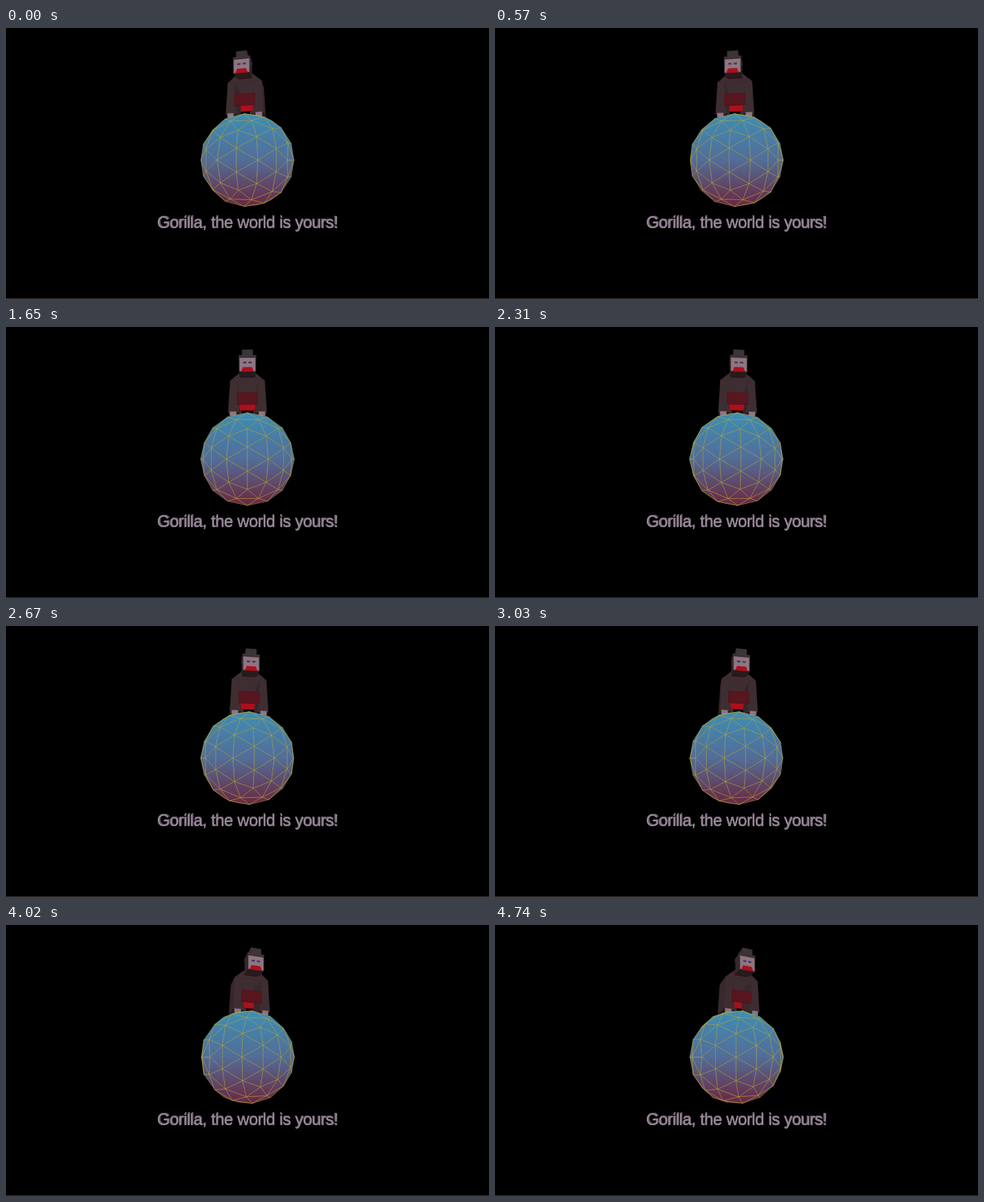
An HTML page with a canvas that plays this animation: 700 by 394 pixels, repeating every 4.77 s.

```html
<!DOCTYPE html>
<html lang="en">
<head>
<meta charset="utf-8">
<style>
  html, body { margin: 0; height: 100%; overflow: hidden; background: #000; }
  canvas { display: block; }
</style>
</head>
<body>
<canvas id="stage" width="700" height="394"></canvas>
<script>
const ctx = document.getElementById('stage').getContext('2d');
const LOOP = 4770, STEP = 30;
const CX = 350, CY = 192, FOCAL = 269, DIST = 4.08;

// Vector helpers
const sub = (a, b) => a.map((v, i) => v - b[i]);
const dot = (a, b) => a[0] * b[0] + a[1] * b[1] + a[2] * b[2];
const cross = (a, b) => [
  a[1] * b[2] - a[2] * b[1], a[2] * b[0] - a[0] * b[2], a[0] * b[1] - a[1] * b[0]];
const unit = a => a.map(v => v / Math.hypot(...a));
const mean = pts => [0, 1, 2].map(i => pts.reduce((s, p) => s + p[i], 0) / pts.length);

const turn = ([x, y, z], a) =>
  [x * Math.cos(a) + z * Math.sin(a), y, z * Math.cos(a) - x * Math.sin(a)];
const project = ([x, y, z]) =>
  [CX + x * FOCAL / (DIST - z), CY - y * FOCAL / (DIST - z)];

// Icosahedron with every edge split in n, pushed out to the unit sphere
function geodesic(n) {
  const phi = (1 + Math.sqrt(5)) / 2, corners = [], faces = [];
  for (const s of [-1, 1]) for (const t of [-phi, phi])
    corners.push([s, t, 0], [0, s, t], [t, 0, s]);
  const joined = (a, b) => Math.hypot(...sub(a, b)) < 2.1;
  corners.forEach((a, i) => corners.slice(i + 1).forEach((b, j) =>
    corners.slice(i + j + 2).forEach(c => {
      if (!joined(a, b) || !joined(b, c) || !joined(a, c)) return;
      const at = (u, v) => unit(a.map((w, k) => w * (n - u - v) + b[k] * u + c[k] * v));
      for (let u = 0; u < n; u++) for (let v = 0; u + v < n; v++) {
        faces.push([at(u, v), at(u + 1, v), at(u, v + 1)]);
        if (u + v < n - 1) faces.push([at(u + 1, v), at(u + 1, v + 1), at(u, v + 1)]);
      }
    })));
  return faces;
}

// Tapered block: front face given as seen on stage, extruded back by depth
function block(rgb, top, bottom, front, depth, wTop, wBottom = wTop, x = 0) {
  const scale = (DIST - front) / FOCAL;
  const corner = (side, w, y) => [(x + side * w / 2) * scale, (CY - y) * scale, front];
  const face = [corner(-1, wTop, top), corner(1, wTop, top),
    corner(1, wBottom, bottom), corner(-1, wBottom, bottom)];
  const back = face.map(([px, py]) => [px, py, front - depth]);
  const sides = face.map((p, i) => {
    const j = (i + 1) % 4;
    return [p, face[j], back[j], back[i]];
  });
  return { faces: [back, ...sides, face], rgb };
}
const pair = (x, ...shape) => [-x, x].map(side => block(...shape, side));

const FUR = [62, 46, 50], FELT = [60, 53, 56], SKIN = [142, 118, 132];
const RED = [172, 16, 28], WINE = [88, 22, 30], DUSK = [70, 62, 90];
const CHEST = .33, FACE = .6, FLAT = .01;

const gorilla = [
  block(FUR, 65, 78, CHEST, .4, 18, 50),
  block(FUR, 78, 113, CHEST, .4, 50, 46),
  ...pair(15, FUR, 112, 126, CHEST, .2, 8, 14),
  block(RED, 111, 121, CHEST, FLAT, 30, 22),
  ...pair(20, FUR, 79, 124, CHEST, .45, 10, 16),
  ...pair(21, SKIN, 123, 129, CHEST, FLAT, 9, 9),
  block(WINE, 95, 112, CHEST, FLAT, 30),
  block(WINE, 62, 67, .45, .2, 20),
  block(FELT, 33, 42, FACE, .24, 15.5),
  block(FELT, 41, 45, FACE, .26, 25),
  block(FUR, 43, 64, FACE, .24, 24.5),
  block(SKIN, 45, 64, FACE, FLAT, 22.5),
  ...pair(4, DUSK, 50.5, 52, FACE, FLAT, 4, 4),
  block(RED, 58.5, 64.5, FACE, FLAT, 13, 18),
];
const globe = { faces: geodesic(3) };

const sky = ctx.createLinearGradient(0, 124, 0, 260);
['#3d8fb6', '#526d98', '#6a2640'].forEach((c, i) => sky.addColorStop(i / 2, c));

function drawSolid(solid, angle, paint) {
  const faces = solid.faces.map(f => f.map(p => turn(p, angle)));
  const centre = mean(faces.map(mean));
  for (const face of faces) {
    let normal = unit(cross(sub(face[1], face[0]), sub(face[2], face[0])));
    if (dot(normal, sub(face[0], centre)) < 0) normal = normal.map(v => -v);
    if (dot(normal, sub([0, 0, DIST], face[0])) <= 0) continue;
    ctx.beginPath();
    face.forEach(p => ctx.lineTo(...project(p)));
    ctx.closePath();
    paint(normal);
    ctx.fill();
    ctx.stroke();
  }
}

// Extruded lettering: shrunken copies behind the front face
function drawCaption() {
  ctx.font = '24px "Liberation Sans", Arial, sans-serif';
  ctx.letterSpacing = '-0.55px';
  ctx.wordSpacing = '0.5px';
  for (let depth = 6; depth >= 0; depth--) {
    const s = 1 - depth * .0022;
    ctx.setTransform(s, 0, 0, s, CX * (1 - s), CY * (1 - s));
    ctx.fillStyle = depth ? '#6a5666' : '#968a9a';
    ctx.fillText('Gorilla, the world is yours!', 218.7, 291);
  }
  ctx.resetTransform();
}

function draw(ms) {
  const angle = (-11 + 6.62 * ms / 1000) * Math.PI / 180;
  ctx.fillStyle = '#000';
  ctx.fillRect(0, 0, 700, 394);
  ctx.fillStyle = '#3a3030';
  ctx.fillRect(0, 393, 700, 1);

  ctx.lineJoin = 'round';
  ctx.lineWidth = .4;
  for (const part of gorilla) {
    drawSolid(part, angle, n => {
      const light = .8 + .2 * n[2] + .2 * n[1];
      ctx.fillStyle = ctx.strokeStyle = `rgb(${part.rgb.map(v => Math.round(v * light))})`;
    });
  }

  ctx.lineWidth = .7;
  ctx.fillStyle = sky;
  ctx.strokeStyle = 'rgba(208, 188, 62, .6)';
  drawSolid(globe, angle, () => {});
  drawCaption();
}

const start = performance.now();
function tick() {
  const ms = (performance.now() - start) % LOOP;
  draw(Math.floor(ms / STEP) * STEP);
  requestAnimationFrame(tick);
}
tick();
</script>
</body>
</html>
```
